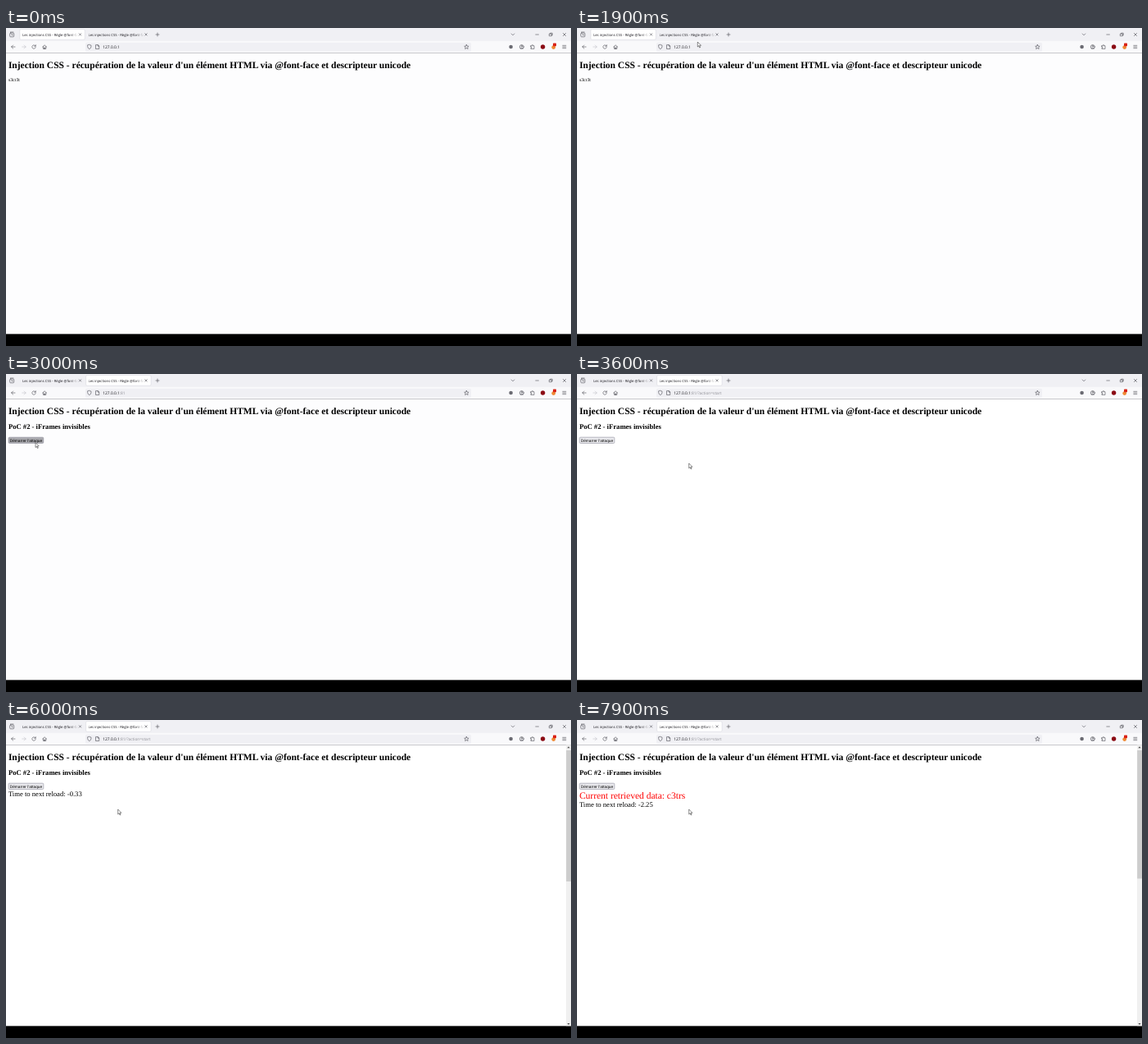
Write an HTML page that moves like this. It is 690 px wide and 388 px high and loops after 8 s.

```html
<!DOCTYPE html>
<html lang="fr">
<head>
<meta charset="utf-8">
<title>Injection CSS</title>
<style>
  html, body { margin: 0; width: 100%; height: 100%; overflow: hidden; background: #000; }
  svg { display: block; width: 100vw; height: 100vh; }
  text { text-rendering: geometricPrecision; white-space: pre; }
  .ui { font-family: "Open Sans", "Noto Sans", sans-serif; fill: #15141a; }
  .page { font-family: "Liberation Serif", "Times New Roman", serif; fill: #000; }
  .icon { fill: none; stroke: #4a4a52; stroke-width: .6; stroke-linecap: round; stroke-linejoin: round; }
  .bold { font-weight: bold; }
</style>
</head>
<body>
<svg viewBox="0 0 690 388" preserveAspectRatio="none">
  <defs>
    <linearGradient id="fade">
      <stop offset=".86" stop-color="#fff"/>
      <stop offset="1" stop-color="#000"/>
    </linearGradient>
    <mask id="titleMask" maskUnits="userSpaceOnUse" x="0" y="0" width="68" height="16">
      <rect width="68" height="16" fill="url(#fade)"/>
    </mask>
    <g id="tabTitle">
      <g mask="url(#titleMask)"><text class="ui" y="9.6" font-size="4.25">Les injections CSS - Règle @font-face</text></g>
      <path class="icon" d="M69.3 6.7l2.4 2.4m0-2.4l-2.4 2.4"/>
    </g>
  </defs>

  <!-- tab strip -->
  <rect width="690" height="16" fill="#f0f0f4"/>
  <rect id="hoverTab" x="97.3" y="1.6" width="80" height="12.6" rx="1.5" fill="#dfdfe4"/>
  <rect id="activeTab" y="1.6" width="79.5" height="12.6" rx="1.5" fill="#fff" stroke="#d3d3da" stroke-width=".5"/>
  <use href="#tabTitle" x="20"/>
  <use href="#tabTitle" x="100.5"/>
  <g class="icon">
    <rect x="4.7" y="6" width="5" height="4.8" rx="1"/>
    <path d="M5.4 5h3.6M7.2 7.2v1.6h1.1M183 8h4M185 6v4M617.2 7l1.8 1.8L620.8 7M646.8 8h3.6M680.4 6.4l3.2 3.2m0-3.2l-3.2 3.2"/>
    <path d="M663.7 7.1h2.6v2.6h-2.6zM664.6 7v-.8h2.6v2.6h-.8"/>
  </g>

  <!-- toolbar -->
  <rect y="15.8" width="690" height="14.6" fill="#f9f9fb"/>
  <rect x="97" y="17.8" width="471" height="10.6" rx="1.5" fill="#f0f0f4"/>
  <g class="icon">
    <path d="M11 23H6.6M8.6 21l-2 2 2 2"/>
    <path d="M19.8 23h4.4M22.2 21l2 2-2 2" stroke="#c0c0c6"/>
    <path d="M36 22a2.2 2.2 0 1 0 .2 1.6M36.3 20.6V22.2h-1.6"/>
    <path d="M44.7 23l2.4-2.2 2.4 2.2M45.4 22.6v2.8h3.4v-2.8M46.6 25.4v-1.5h1v1.5"/>
    <path d="M101.8 20.4l2.2.8c.1 2.2-.5 3.6-2.2 4.5-1.7-.9-2.3-2.3-2.2-4.5z"/>
    <path d="M109.9 20.6h2.4l1.4 1.4v3.5h-3.8zM112.2 20.7v1.4h1.4"/>
    <path d="M562.4 20.4l.8 1.7 1.9.2-1.4 1.3.4 1.9-1.7-1-1.7 1 .4-1.9-1.4-1.3 1.9-.2z"/>
    <circle cx="629.8" cy="23" r="2.5"/>
    <circle cx="629.8" cy="22.2" r=".8"/>
    <path d="M628.2 24.8q1.6-1.4 3.2 0M640.9 21.7h1.3v-.9h1.4v.9h1.4v3.7h-4.1v-1.1h.9v-1.4h-.9z"/>
    <path d="M679.8 21.3h4M679.8 23h4M679.8 24.7h4"/>
  </g>
  <circle cx="616.6" cy="23" r="2.3" fill="#6a6a72"/>
  <circle cx="655.6" cy="23" r="2.7" fill="#8b0a14"/>
  <circle cx="668.7" cy="23.6" r="2.4" fill="#ee8a35"/>
  <rect x="668" y="18.6" width="4" height="3.6" rx=".7" fill="#d92215"/>
  <text class="ui" x="118.3" y="24.8" font-size="4.85">127.0.0.1<tspan id="urlTail" fill="#8e8e96"></tspan></text>

  <!-- page -->
  <rect id="paper" y="30.4" width="690" height="343.2"/>
  <rect y="30" width="690" height=".5" fill="#cfcfd6"/>
  <text class="page bold" x="2.9" y="48.7" font-size="11.5">Injection CSS - récupération de la valeur d'un élément HTML via @font-face et descripteur unicode</text>
  <text id="secret" class="page" x="2.9" y="64.6" font-size="5.75">s3cr3t</text>
  <g id="attack">
    <text class="page bold" x="2.9" y="67.4" font-size="8.625">PoC #2 - iFrames invisibles</text>
    <rect id="button" x="3.1" y="77.2" width="42.7" height="7.3" rx="1.2" stroke="#8f8f9d" stroke-width=".6"/>
    <text x="4.7" y="82.6" font-size="4.79" font-family="Liberation Sans, Arial, sans-serif">Démarrer l'attaque</text>
  </g>
  <text id="found" class="page" x="2.9" y="95.8" font-size="11.5" style="fill:#f00">Current retrieved data: c3trs</text>
  <text id="timer" class="page" x="2.9" font-size="8.625"></text>
  <g id="scrollbar">
    <rect x="683.9" y="30.4" width="6.1" height="343.2" fill="#f0f0f0"/>
    <rect id="thumb" x="684.2" y="37" width="5.8" fill="#cdcdcd"/>
    <path d="M685.4 34.3l1.6-2 1.6 2zM685.4 370l1.6 2 1.6-2z" fill="#505050"/>
  </g>
  <rect y="373.6" width="690" height="14.4"/>

  <g id="cursor" stroke-linejoin="round">
    <path id="arrow" d="M0 0V6L1.4 4.7 2.4 7 3.3 6.6 2.3 4.4 4.2 4.3Z" fill="#fff" stroke="#000" stroke-width=".45"/>
    <path id="beam" d="M-1.2-3.2H1.2M0-3.2V3.2M-1.2 3.2H1.2" stroke="#222" stroke-width=".5"/>
  </g>
</svg>
<script>
const LOOP = 8000, STEP = 100;
const SWITCH_TAB = 2400, CLICK = 3000, LOADED = 3100, TIMER_START = 4700, FOUND = 7400;

// time, x, y
const route = [
  [100, 401, 96], [200, 286, 88], [300, 209, 83], [400, 150, 76], [500, 111, 73], [600, 86, 69],
  [900, 13, 62.5], [1000, 12.5, 62.5], [1100, 12.5, 62.5],
  [1400, 50, 51], [1700, 120, 30], [1900, 147.3, 17], [2000, 152, 9], [2100, 152, 8], [2300, 152, 8],
  [2600, 70, 55], [2800, 38, 80], [3000, 36, 83.6], [3100, 37, 84],
  [3200, 54, 90], [3400, 118, 105], [3600, 136.7, 109]
];

const $ = id => document.getElementById(id);
const show = (id, on) => $(id).setAttribute("display", on ? "inline" : "none");
const set = (id, name, value) => $(id).setAttribute(name, value);

function cursorAt(t) {
  const next = route.findIndex(p => p[0] >= t);
  if (next < 0) return route.at(-1).slice(1);
  if (next === 0) return route[0].slice(1);
  const [t0, x0, y0] = route[next - 1], [t1, x1, y1] = route[next];
  const k = (t - t0) / (t1 - t0);
  return [x0 + (x1 - x0) * k, y0 + (y1 - y0) * k];
}

function timerText(t) {
  // The counter refreshes at half rate during its first moments
  const tick = t < 5200 ? Math.max(TIMER_START, Math.floor(t / 200) * 200) : t;
  const left = 0.473 - (tick - 5200) / 1000 * 1.01;
  return "Time to next reload: " + left.toFixed(3).slice(0, 5);
}

function buttonColor(t) {
  if (t === CLICK) return "#a9a9ae";
  return t >= 2800 && t < 3200 ? "#d0d0d7" : "#e9e9ed";
}

function draw(t) {
  const second = t >= SWITCH_TAB, timing = t >= TIMER_START, found = t >= FOUND;
  const overText = t >= 900 && t < 1200;

  set("activeTab", "x", second ? 97.6 : 16.8);
  show("hoverTab", t >= 2000 && !second);
  $("urlTail").textContent = !second ? "" : t < LOADED ? ":81" : ":81/?action=start";
  $("urlTail").style.fill = "#8e8e96";
  set("paper", "fill", t < LOADED ? "#fdfdfe" : "#fff");

  show("secret", !second);
  show("attack", second);
  set("button", "fill", buttonColor(t));

  show("found", found);
  show("timer", timing);
  show("scrollbar", timing);
  if (timing) {
    $("timer").textContent = timerText(t);
    set("timer", "y", found ? 106.4 : 92.8);
    set("thumb", "height", found ? 156.5 : 160);
  }

  show("cursor", t >= 100);
  show("arrow", !overText);
  show("beam", overText);
  set("cursor", "transform", `translate(${cursorAt(t)})`);
}

const start = performance.now();
function frame() {
  const t = (performance.now() - start) % LOOP;
  draw(Math.floor(t / STEP) * STEP);
  requestAnimationFrame(frame);
}
frame();
</script>
</body>
</html>
```
